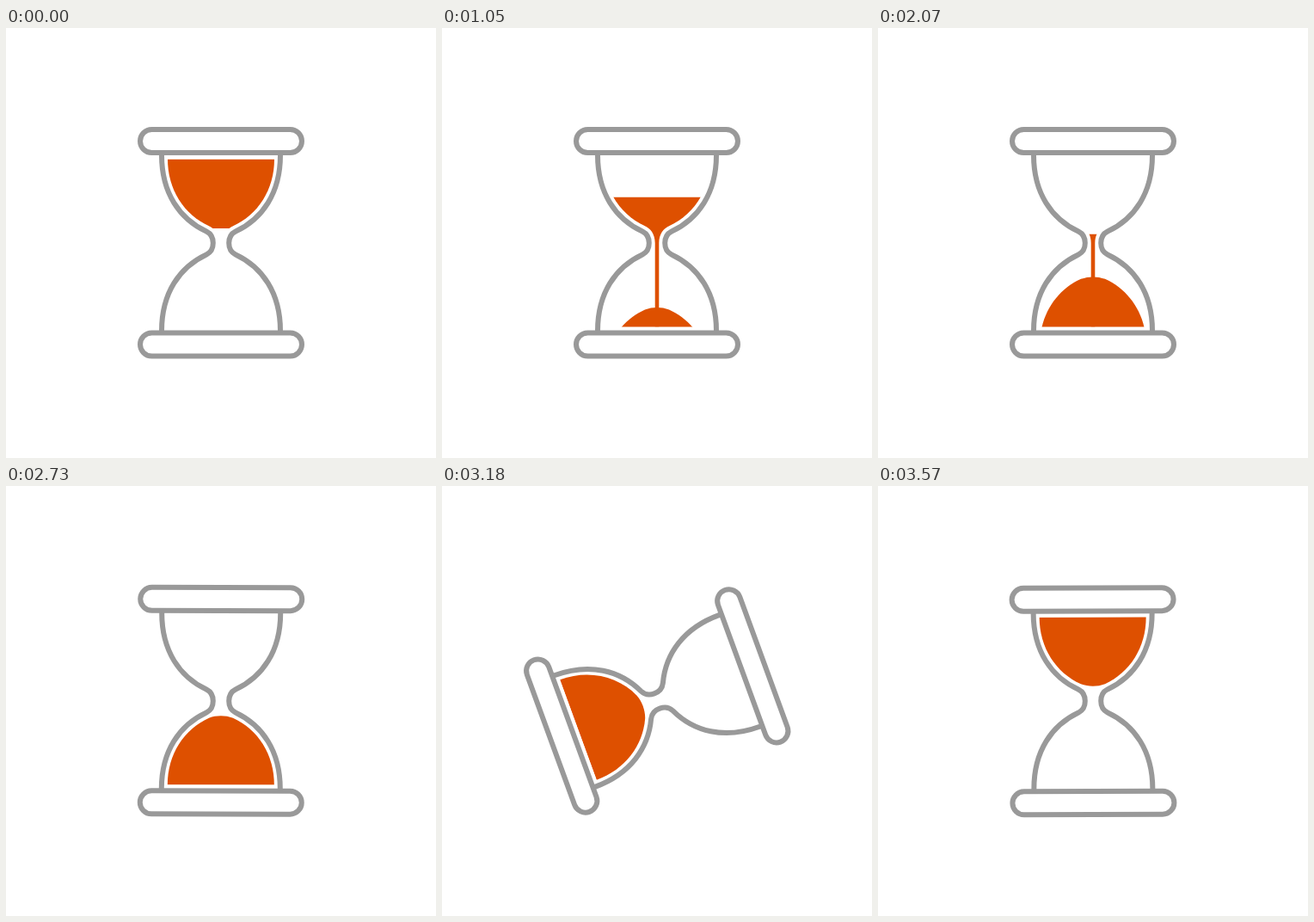
Write an HTML page that moves like this. It is 500 px wide and 500 px high and loops after 3600 ms.

```html
<!DOCTYPE html>
<html lang="en">
<head>
<meta charset="utf-8">
<title>Hourglass</title>
<style>
  html, body { margin: 0; width: 100%; height: 100%; overflow: hidden; background: #fff; }
  svg { display: block; width: 100vw; height: 100vh; }
  .frame { fill: none; stroke: #999; stroke-width: 6; }
  .bar { fill: #fff; }
  .sand { fill: #de5000; }
</style>
</head>
<body>
<svg viewBox="0 0 500 500">
  <defs>
    <clipPath id="upper"><rect id="window" x="150" width="200"/></clipPath>
    <clipPath id="lower"><rect x="150" y="250" width="200" height="97.5"/></clipPath>
    <path id="side" d="M181 146V148C181 192 202 222 233 236.5C238 239 240.8 244 240.8 250S238 261 233 263.5C202 278 181 308 181 352V354"/>
    <path id="bowl" d="M188 152.5H312C312 188 293 217 264 230.2C255 233.5 245 233.5 236 230.2C207 217 188 188 188 152.5Z"/>
  </defs>
  <g id="glass">
    <g class="sand">
      <g clip-path="url(#upper)">
        <use href="#bowl"/>
        <path id="stream"/>
      </g>
      <g clip-path="url(#lower)">
        <g id="pile"><use href="#bowl" transform="matrix(1 0 0 -1 0 500)"/></g>
      </g>
    </g>
    <g class="frame">
      <use href="#side"/>
      <use href="#side" transform="matrix(-1 0 0 1 500 0)"/>
      <rect class="bar" x="156" y="118" width="188" height="27" rx="13.5"/>
      <rect class="bar" x="156" y="354.5" width="188" height="27" rx="13.5"/>
    </g>
  </g>
</svg>
<script>
const LOOP = 3600, POUR = 2700, LAND = 415;
const $ = id => document.getElementById(id);
const set = (id, attrs) => {
  for (const [name, value] of Object.entries(attrs)) $(id).setAttribute(name, value);
};
const mix = (a, b, p) => a + (b - a) * Math.min(1, Math.max(0, p));

set('stream', {
  d: 'M236 230.2C242 233 247.7 239 247.7 250V347.5H252.3V250C252.3 239 258 233 264 230.2Z'
});

// cubic-bezier(x1, 0, x2, 1), solved by bisection
function ease(x, x1, x2) {
  let lo = 0, hi = 1, s;
  for (let i = 0; i < 30; i++) {
    s = (lo + hi) / 2;
    const bx = 3 * x1 * s * (1 - s) ** 2 + 3 * x2 * s * s * (1 - s) + s ** 3;
    if (bx < x) lo = s; else hi = s;
  }
  return s * s * (3 - 2 * s);
}

function draw(t) {
  const poured = t / POUR;
  const level = mix(152.5, 266.3, poured);
  const front = t < POUR ? mix(233, 347.5, t / LAND) : level;
  const turn = t > POUR ? 180 * ease((t - POUR) / (LOOP - POUR), 0.78, 0.41) : 0;

  set('window', { y: level, height: front - level });
  set('pile', { transform: `translate(0 ${mix(94.5, 0, poured)})` });
  set('glass', { transform: `rotate(${turn} 250 250)` });
}

let start;
function tick(now) {
  start ??= now;
  draw((now - start) % LOOP);
  requestAnimationFrame(tick);
}
draw(0);
requestAnimationFrame(tick);
</script>
</body>
</html>
```
